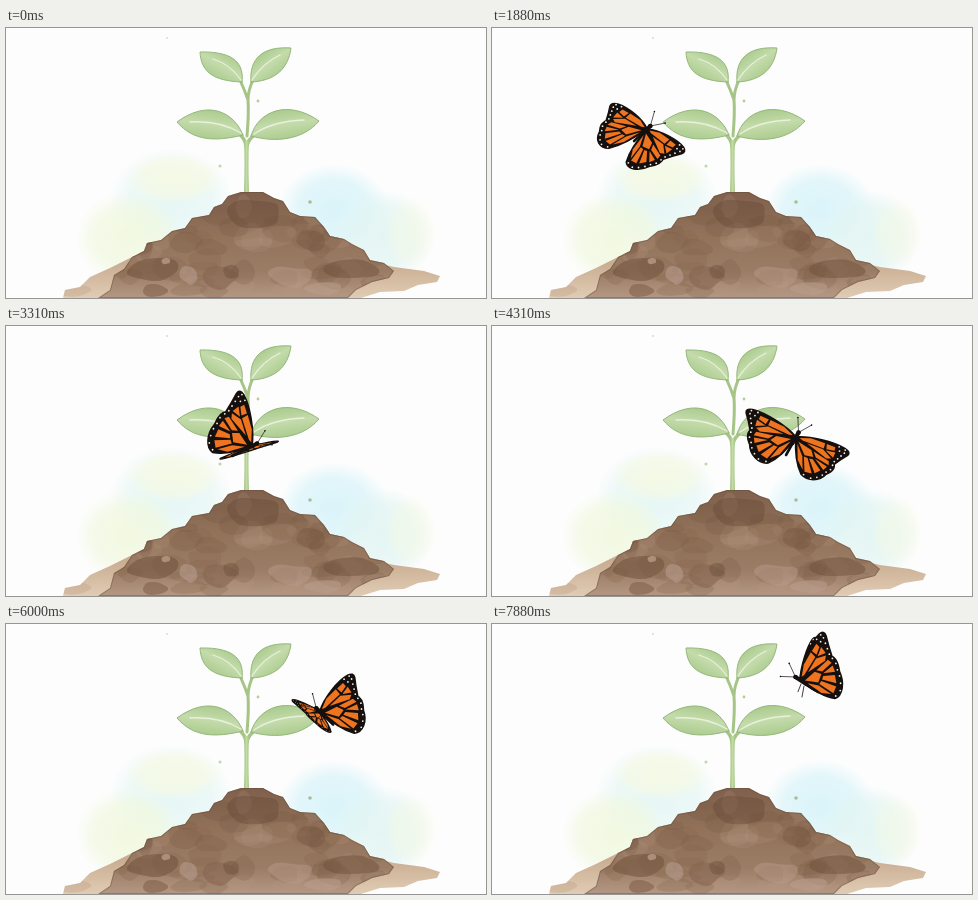
These frames come from a looping animation (480 px wide and 270 px high, 7950 ms). An HTML page with a canvas:

```html
<!DOCTYPE html>
<html lang="en">
<head>
<meta charset="utf-8">
<title>Seedling and butterfly</title>
<style>
html, body { margin: 0; width: 100%; height: 100%; overflow: hidden; background: #fdfdfd; }
canvas { display: block; width: 480px; height: 270px; }
</style>
</head>
<body>
<canvas id="stage" width="480" height="270"></canvas>
<script>
const W = 480, H = 270, LOOP = 7950;
const ctx = document.getElementById('stage').getContext('2d');
const TAU = Math.PI * 2;

let seed = 11;
function rnd() {
  seed = (seed * 16807) % 2147483647;
  return seed / 2147483647;
}
const between = (a, b) => a + rnd() * (b - a);

/* ---------- still scene ---------- */

function wash(g, x, y, rx, ry, rgb, alpha) {
  g.save();
  g.translate(x, y);
  g.scale(rx, ry);
  const fade = g.createRadialGradient(0, 0, 0, 0, 0, 1);
  fade.addColorStop(0, `rgba(${rgb},${alpha})`);
  fade.addColorStop(.65, `rgba(${rgb},${alpha * .75})`);
  fade.addColorStop(1, `rgba(${rgb},0)`);
  g.fillStyle = fade;
  g.fillRect(-1, -1, 2, 2);
  g.restore();
}

function blob(g, x, y, rx, ry, color) {
  const n = 9, pts = [];
  for (let i = 0; i < n; i++) {
    const a = i / n * TAU, r = between(.7, 1.15);
    pts.push([x + Math.cos(a) * rx * r, y + Math.sin(a) * ry * r]);
  }
  g.beginPath();
  for (let i = 0; i <= n; i++) {
    const p = pts[i % n], q = pts[(i + 1) % n];
    const mx = (p[0] + q[0]) / 2, my = (p[1] + q[1]) / 2;
    if (i) g.quadraticCurveTo(p[0], p[1], mx, my);
    else g.moveTo(mx, my);
  }
  g.fillStyle = color;
  g.fill();
}

function drawSky(g) {
  g.fillStyle = '#fdfdfd';
  g.fillRect(0, 0, W, H);
  wash(g, 165, 172, 62, 52, '226,246,244', .85);
  wash(g, 122, 210, 52, 46, '240,248,222', .9);
  wash(g, 168, 150, 48, 26, '250,250,222', .7);
  wash(g, 328, 182, 56, 46, '214,243,249', .9);
  wash(g, 378, 208, 50, 46, '226,245,243', .95);
  wash(g, 405, 205, 26, 36, '248,249,225', .5);
}

const MOUND = 'M92 270 L104 262 108 247 118 241 126 229 138 223 141 215 155 212 ' +
  '166 203 179 200 186 190 203 187 208 179 216 176 222 168 235 164 257 164 ' +
  '268 170 277 173 284 184 294 188 309 189 318 199 324 208 338 211 346 216 ' +
  '358 222 364 232 378 235 388 243 383 250 366 254 350 262 342 270 Z';

function drawSoil(g) {
  const ground = new Path2D('M57 270 L59 262 74 259 84 249 104 240 128 228 ' +
    '350 230 388 239 418 243 434 248 431 254 412 257 398 263 374 264 355 270 Z');
  const tan = g.createLinearGradient(0, 235, 0, 270);
  tan.addColorStop(0, '#c9ad92');
  tan.addColorStop(1, '#e0ccb3');
  g.fillStyle = tan;
  g.fill(ground);
  g.save();
  g.clip(ground);
  for (let i = 0; i < 9; i++)
    blob(g, between(62, 425), between(246, 268), between(10, 24), between(3, 7), 'rgba(174,140,116,.25)');
  g.restore();

  const mound = new Path2D(MOUND);
  const brown = g.createLinearGradient(0, 164, 0, 270);
  brown.addColorStop(0, '#7f604c');
  brown.addColorStop(.4, '#927259');
  brown.addColorStop(.75, '#9b7c65');
  brown.addColorStop(1, '#b49883');
  g.fillStyle = brown;
  g.fill(mound);
  g.save();
  g.clip(mound);
  const tones = ['rgba(112,80,60,.2)', 'rgba(180,150,132,.2)', 'rgba(135,100,78,.28)'];
  for (let i = 0; i < 65; i++)
    blob(g, between(105, 380), between(172, 268), between(8, 24), between(5, 14), tones[i % 3]);
  // loose clods along the foot
  blob(g, 148, 241, 30, 15, 'rgba(111,79,57,.5)');
  blob(g, 213, 248, 22, 14, 'rgba(135,102,80,.6)');
  blob(g, 225, 243, 8, 9, 'rgba(103,75,57,.4)');
  blob(g, 348, 242, 32, 10, 'rgba(112,80,59,.5)');
  blob(g, 248, 186, 30, 17, 'rgba(101,71,53,.4)');
  blob(g, 305, 212, 18, 12, 'rgba(110,78,58,.35)');
  blob(g, 183, 247, 12, 10, 'rgba(190,162,150,.5)');
  blob(g, 285, 249, 25, 12, 'rgba(184,155,140,.45)');
  blob(g, 148, 263, 14, 7, 'rgba(131,97,75,.6)');
  blob(g, 318, 260, 22, 7, 'rgba(188,160,142,.5)');
  blob(g, 160, 233, 5, 4, 'rgba(202,175,154,.6)');
  g.strokeStyle = 'rgba(98,70,53,.4)';
  g.lineWidth = 2;
  g.stroke(mound);
  g.restore();
}

function leaf(g, shape, vein, x0, y0, x1, y1) {
  const path = new Path2D(shape);
  const green = g.createLinearGradient(x0, y0, x1, y1);
  green.addColorStop(0, '#a6c889');
  green.addColorStop(.5, '#c4dbab');
  green.addColorStop(1, '#a9ca8c');
  g.fillStyle = green;
  g.fill(path);
  g.strokeStyle = '#94b77b';
  g.lineWidth = 1;
  g.stroke(path);
  g.strokeStyle = '#e8f1d9';
  g.lineWidth = 1.3;
  g.stroke(new Path2D(vein));
}

function drawPlant(g) {
  g.lineCap = 'round';
  g.strokeStyle = '#a5c485';
  g.lineWidth = 3;
  g.stroke(new Path2D('M241 108 Q243 85 242 72 Q239 63 234 52 M242 72 Q242 63 247 52'));
  g.lineWidth = 3.4;
  g.stroke(new Path2D('M240 118 Q239 110 232 105 M241 118 Q242 111 250 106'));
  const stem = g.createLinearGradient(237, 0, 244, 0);
  stem.addColorStop(0, '#94b776');
  stem.addColorStop(.5, '#c3dba5');
  stem.addColorStop(1, '#9bbd7e');
  g.fillStyle = stem;
  g.fill(new Path2D('M238 164 Q239 135 238 112 L243 112 Q242 135 243 164 Z'));

  leaf(g, 'M236 54 C238 38 231 23 194 24 C195 43 206 53 236 54 Z',
    'M235 52 Q224 36 207 31', 224, 23, 208, 52);
  leaf(g, 'M245 54 C243 31 256 18 285 20 C282 42 268 53 245 54 Z',
    'M246 52 Q257 35 274 27', 253, 23, 273, 50);
  leaf(g, 'M237 107 C228 84 202 71 171 94 C187 113 209 114 237 107 Z',
    'M235 105 Q213 92 184 94', 207, 79, 202, 113);
  leaf(g, 'M245 108 C252 83 282 71 313 93 C297 112 270 115 245 108 Z',
    'M248 106 Q267 93 298 92', 280, 79, 285, 112);
}

function drawSpecks(g) {
  const dot = (x, y, r, c) => {
    g.fillStyle = c;
    g.beginPath();
    g.arc(x, y, r, 0, TAU);
    g.fill();
  };
  dot(252, 73, 1.4, '#b7cf8e');
  dot(214, 138, 1.6, '#bcdcae');
  dot(304, 174, 1.8, '#a9bd94');
  dot(161, 10, .9, '#cfd8c6');
}

const scene = document.createElement('canvas');
scene.width = W;
scene.height = H;
const sg = scene.getContext('2d');
drawSky(sg);
drawSoil(sg);
drawPlant(sg);
drawSpecks(sg);

/* ---------- butterfly ---------- */

// Wing space: (1,0) is the forewing tip, (0,1) the hindwing tip.
const FORE = new Path2D('M0 0 C.3 -.14 .75 -.16 .95 -.07 Q1.06 -.01 .98 .09 ' +
  'Q.82 .25 .68 .42 Q.45 .42 0 .06 Z');
const HIND = new Path2D('M0 0 L.66 .38 Q.7 .56 .46 .76 C.3 1 .05 1.09 -.05 .95 Q-.13 .6 0 0 Z');
const CELLS = [
  '.07 0 .3 -.08 .57 -.06 .52 .09 .12 .04',
  '.6 -.05 .76 -.03 .73 .07 .57 .09',
  '.2 .09 .5 .12 .63 .3 .53 .34',
  '.55 .13 .74 .11 .67 .27',
  '.03 .11 .26 .23 .27 .4 .1 .42',
  '.3 .25 .57 .39 .55 .5 .32 .39',
  '.3 .43 .51 .55 .42 .67',
  '.25 .46 .36 .7 .23 .82 .18 .47',
  '.15 .47 .17 .85 .03 .86 .08 .46',
  '0 .17 .05 .46 0 .82 -.06 .6'
].map(p => new Path2D('M' + p + 'Z'));
const SPOTS = [[.95, -.03], [.92, .06], [.84, .16], [.76, .26], [.68, .36], [.84, -.07], [.83, .04],
  [.63, .47], [.57, .6], [.47, .7], [.38, .81], [.26, .91], [.13, .98], [0, .94]];

// Pose: left tip, left hind, right tip, right hind, tail vectors, leg length.
const SIDE = [-12, -54, -42, 4, 25, -4, -32, 13, -20, 10, 0];
const SPREAD = [-50, 10, 4, 38, 44, -19, 36, 28, 9, 17, 0];
const RAISED = [-20, -46, -30, 8, 22, -46, 34, 8, 0, 20, 0];
// beats: half wing strokes until the next key, always odd
const KEYS = [
  { t: 0, x: -75, y: 120, beats: 9, pose: SIDE },
  { t: 1880, x: 155, y: 101, beats: 7, pose: [-34, -25, -42, 19, 37, 22, -20, 36, -13, 12, 0] },
  { t: 3310, x: 246, y: 120, beats: 5, pose: SIDE },
  { t: 4310, x: 304, y: 111, beats: 3, pose: [-48, -27, -32, 26, 52, 15, 8, 40, -10, 18, 0] },
  { t: 4820, x: 312, y: 112, beats: 3, pose: RAISED },
  { t: 5380, x: 313, y: 102, beats: 7, pose: SPREAD },
  { t: 6630, x: 314, y: 73, beats: 3, pose: [22, -52, 40, 15, -7, -29, 16, 6, 18, 9, 9] },
  { t: 7250, x: 313, y: 63, beats: 3, pose: SPREAD },
  { t: 7880, x: 308, y: 56, beats: 1, pose: [23, -47, 38, 17, 15, -42, 26, 12, 18, 12, 11] }
];
// the near wing of the left-facing poses belongs to the right side
for (const k of [KEYS[6], KEYS[8]]) {
  const p = k.pose;
  k.pose = [...p.slice(4, 8), ...p.slice(0, 4), ...p.slice(8)];
}

function slope(i, axis) {
  const a = KEYS[i - 1], b = KEYS[i + 1];
  if (!b) return 0;
  if (!a) return (b[axis] - KEYS[i][axis]) / (b.t - KEYS[i].t);
  return (b[axis] - a[axis]) / (b.t - a.t);
}

function hermite(i, s, axis) {
  const a = KEYS[i], b = KEYS[i + 1], d = b.t - a.t;
  const s2 = s * s, s3 = s2 * s;
  return (2 * s3 - 3 * s2 + 1) * a[axis] + (s3 - 2 * s2 + s) * d * slope(i, axis) +
    (3 * s2 - 2 * s3) * b[axis] + (s3 - s2) * d * slope(i + 1, axis);
}

function stateAt(t) {
  let i = 0;
  while (i < KEYS.length - 2 && t >= KEYS[i + 1].t) i++;
  const a = KEYS[i], b = KEYS[i + 1];
  const s = Math.min(1, (t - a.t) / (b.t - a.t));
  const mix = .5 - .5 * Math.cos(Math.PI * a.beats * s);
  return {
    x: hermite(i, s, 'x'),
    y: hermite(i, s, 'y'),
    pose: a.pose.map((v, j) => v + (b.pose[j] - v) * (j < 8 ? mix : s))
  };
}

function drawWing(m) {
  const mapped = path => {
    const p = new Path2D();
    p.addPath(path, new DOMMatrix([...m, 0, 0]));
    return p;
  };
  ctx.fillStyle = ctx.strokeStyle = '#15100e';
  ctx.lineWidth = 1.6;
  for (const shape of [HIND, FORE]) {
    const p = mapped(shape);
    ctx.fill(p);
    ctx.stroke(p);
  }
  ctx.fillStyle = '#ee7420';
  for (const c of CELLS) ctx.fill(mapped(c));
  ctx.fillStyle = '#f6efe6';
  const r = Math.min(.9, Math.abs(m[0] * m[3] - m[1] * m[2]) / 1200);
  for (const [u, v] of SPOTS) {
    ctx.beginPath();
    ctx.arc(u * m[0] + v * m[2], u * m[1] + v * m[3], r, 0, TAU);
    ctx.fill();
  }
}

function line(x0, y0, x1, y1, width) {
  ctx.lineWidth = width;
  ctx.beginPath();
  ctx.moveTo(x0, y0);
  ctx.lineTo(x1, y1);
  ctx.stroke();
}

function drawButterfly(t) {
  const { x, y, pose } = stateAt(t);
  const area = m => Math.abs(m[0] * m[3] - m[1] * m[2]);
  const wings = [pose.slice(0, 4), pose.slice(4, 8)].sort((a, b) => area(a) - area(b));
  const [tx, ty, legs] = pose.slice(8);
  const hx = -tx * .25, hy = -ty * .25, dir = Math.atan2(-ty, -tx);
  ctx.save();
  ctx.translate(x, y);
  ctx.lineCap = ctx.lineJoin = 'round';
  wings.forEach(drawWing);
  ctx.strokeStyle = ctx.fillStyle = '#15100e';
  line(0, 0, tx, ty, 2.6);
  line(hx, hy, tx * .35, ty * .35, 4);
  ctx.beginPath();
  ctx.arc(hx, hy, 2.3, 0, TAU);
  ctx.fill();
  for (const side of [-.55, .55]) {
    const ex = hx + Math.cos(dir + side) * 15, ey = hy + Math.sin(dir + side) * 15;
    line(hx, hy, ex, ey, .7);
    ctx.beginPath();
    ctx.arc(ex, ey, .8, 0, TAU);
    ctx.fill();
  }
  if (legs > 1) {
    line(1, 4, -2, 4 + legs * .7, .8);
    line(4, 6, 2, 6 + legs, .8);
  }
  ctx.restore();
}

const start = performance.now();
function frame() {
  const t = (performance.now() - start) % LOOP;
  ctx.drawImage(scene, 0, 0);
  drawButterfly(t);
  requestAnimationFrame(frame);
}
frame();
</script>
</body>
</html>
```
